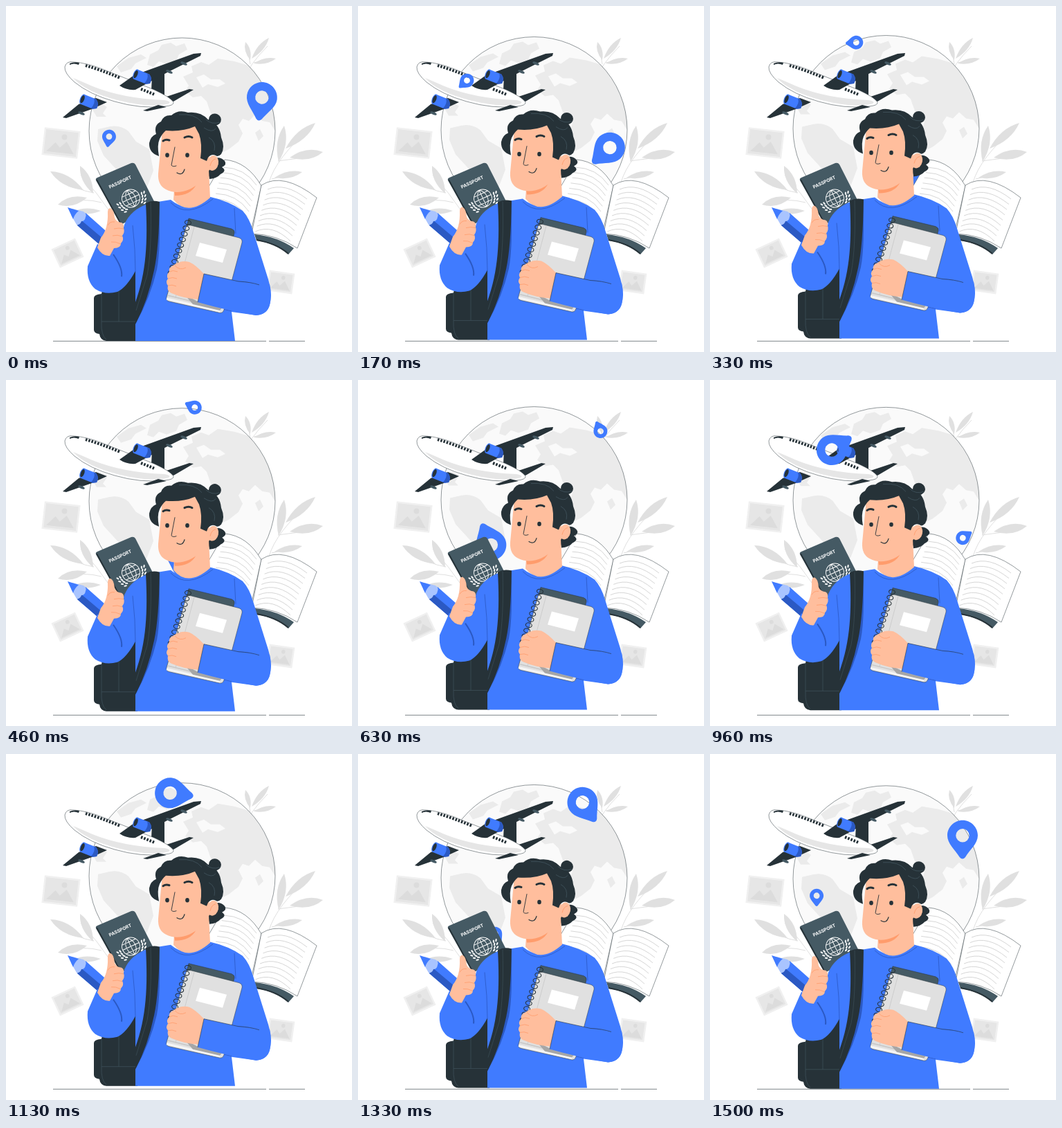
An HTML page with a canvas for the animation above (1.54 s loop, 500 by 500 pixels).

```html
<!DOCTYPE html>
<html lang="en">
<head>
<meta charset="utf-8">
<title>Travel and study</title>
<style>
html, body { margin: 0; width: 100%; height: 100%; overflow: hidden; background: #fff; }
canvas { display: block; width: 500px; height: 500px; }
</style>
</head>
<body>
<canvas id="stage" width="500" height="500"></canvas>
<script>
const ctx = document.getElementById('stage').getContext('2d');
const LOOP = 1540;
const TURN = [[0, 0], [460, 107], [1330, 318], [LOOP, 360]]; // time in ms, degrees
const BLUE = '#407bff', NAVY = '#2b59c3', DARK = '#263238', SLATE = '#455a64';
const SKIN = '#ffbe9d', SHADE = '#ff9c6c', GREY = '#e0e0e0', PALE = '#ebebeb';
const paths = new Map();

function path(d) {
  if (!paths.has(d)) paths.set(d, new Path2D(d));
  return paths.get(d);
}
function fill(d, color, rule = 'nonzero') {
  ctx.fillStyle = color;
  ctx.fill(path(d), rule);
}
function line(d, color = DARK, width = 0.7) {
  ctx.strokeStyle = color;
  ctx.lineWidth = width;
  ctx.stroke(path(d));
}
function shape(d, color, edge = DARK, width = 0.5) {
  fill(d, color);
  line(d, edge, width);
}
function oval(x, y, rx, ry, color, turn = 0) {
  ctx.fillStyle = color;
  ctx.beginPath();
  ctx.ellipse(x, y, rx, ry, turn, 0, 7);
  ctx.fill();
}
function at(x, y, degrees, scale, draw) {
  ctx.save();
  ctx.translate(x, y);
  ctx.rotate(degrees * Math.PI / 180);
  ctx.scale(scale, scale);
  draw();
  ctx.restore();
}

function leaf(x0, y0, x1, y1, width, color = GREY) {
  const length = Math.hypot(x1 - x0, y1 - y0);
  at(x0, y0, Math.atan2(y1 - y0, x1 - x0) * 180 / Math.PI, 1, () => {
    const mid = length * 0.55;
    ctx.beginPath();
    ctx.moveTo(0, 0);
    ctx.quadraticCurveTo(mid, -width, length, 0);
    ctx.quadraticCurveTo(mid, width, 0, 0);
    ctx.fillStyle = color;
    ctx.fill();
  });
}
function drawLeaves() {
  line('M344 106Q351 85 378 58M353 84L349 60M358 82L382 77', GREY, 1);
  leaf(353, 78, 346, 52, 7);
  leaf(355, 76, 380, 46, 8);
  leaf(358, 83, 390, 76, 7);
  line('M150 297Q132 270 108 244M127 270Q100 266 80 247M138 284Q112 277 88 284', GREY, 1);
  leaf(126, 271, 107, 231, 11);
  leaf(112, 266, 64, 239, 13);
  leaf(117, 277, 75, 287, 12);
  leaf(137, 296, 98, 297, 8);
  line('M380 255Q390 220 440 176M397 218L401 190M393 224Q420 222 445 214M384 250L415 242', GREY, 1);
  leaf(394, 225, 402, 173, 12);
  leaf(404, 206, 447, 169, 12);
  leaf(410, 219, 458, 211, 13);
  leaf(388, 248, 428, 240, 9);
}
function photo(x, y, degrees, width, height) {
  at(x, y, degrees, 1, () => {
    ctx.fillStyle = '#f0f0f0';
    ctx.fillRect(-width / 2, -height / 2, width, height);
    ctx.fillStyle = '#e6e6e6';
    ctx.fillRect(-width / 2 + 2.5, -height / 2 + 2.5, width - 5, height - 5);
    ctx.scale(width / 52, height / 40);
    fill('M-20 14L-8 0L-1 7L8 -3L20 14Z', '#dcdcdc');
    oval(4, -9, 4, 4, '#dcdcdc');
  });
}

function drawGlobe() {
  oval(254.5, 180.5, 134.5, 134.5, '#fafafa');
  ctx.save();
  ctx.beginPath();
  ctx.arc(254.5, 180.5, 134.5, 0, 7);
  ctx.clip();
  fill('M204 85L208 70L220 64L225 56L238 53L246 58L258 54L262 63L250 70L246 79L232 84L221 80L213 88Z', PALE);
  fill('M160 87L177 75L195 70L203 75L187 83L181 91L166 96ZM124 148L136 140L146 146L140 155L145 160L131 160Z', PALE);
  fill('M133 178L142 176Q163 169 177 181L188 196L207 207L213 238L203 264L180 264L163 240L141 216L132 195Z', PALE);
  fill('M256 102L270 96L268 87L282 81L293 85L306 76L330 80L354 87L391 145L391 184L381 168L370 166L360 157L351 166L342 163L336 172L342 184L336 196L322 207L312 212L303 190L310 171L297 158L290 138L282 130L270 132L259 123L264 115Z', PALE);
  fill('M275 103L286 99L296 106L309 106L317 112L306 117L292 113L284 118Z', '#fafafa');
  fill('M360 183L367 178L372 188L365 195Z', PALE);
  ctx.restore();
  ctx.beginPath();
  ctx.arc(254.5, 180.5, 134.5, 0, 7);
  ctx.strokeStyle = DARK;
  ctx.lineWidth = 0.5;
  ctx.stroke();
}

function engine(x, y) {
  at(x, y, 22, 1, () => {
    fill('M-11 -7L8 -7Q15 -3 14 5L9 8L-10 8Z', BLUE);
    fill('M5 -7L8 -7Q15 -3 14 5L9 8L6 8Q10 0 5 -7Z', NAVY);
    oval(-10, 0.5, 3.6, 7.6, BLUE);
    oval(-10, 0.5, 2.5, 6, DARK);
  });
}
function drawPlane() {
  fill('M211 101L229 91L229 129L210 122Z', DARK);
  fill('M229 132L265 120L271 121L242 138Z', DARK);
  shape('M98 81Q87 79 85 88Q84 97 99 110Q121 128 157 138Q195 149 229 145Q243 144 242 139Q238 132 214 121L139 91Q116 82 98 81Z', '#fff');
  fill('M97 104Q107 108 125 116Q170 134 229 136Q240 138 235 141Q211 148 165 137Q116 125 97 104Z', '#e6e6e6');
  fill('M92 83Q99 80 106 82L105 85Q98 82 92 85Z', DARK);
  ctx.setLineDash([2.6, 1.9]);
  line('M115 86Q139 93 165 104M195 120L215 128', DARK, 4.2);
  ctx.setLineDash([]);
  fill('M164 115L185 100L271 69L282 68L281 72L233 96L187 121Q174 122 164 115Z', DARK);
  fill('M82 161L105 142L130 133L146 139L124 149L87 162Z', DARK);
  fill('M198 151L220 143L232 146L204 152Z', DARK);
  for (const [x, y] of [[236, 95], [257, 83], [109, 155]]) {
    oval(x, y, 5, 2, SLATE, 0.4);
  }
  engine(197, 102);
  engine(120, 138);
}

function pin(angle, radius, start, scale) {
  const a = (angle + start) * Math.PI / 180;
  const x = 266 + radius * Math.cos(a), y = 160 + radius * Math.sin(a);
  at(x, y, angle + 8, scale, () => fill(
    'M0 -22C12 -22 22 -12 22 0C22 12 11 20 4 31.5Q0 36 -4 31.5C-11 20 -22 12 -22 0C-22 -12 -12 -22 0 -22Z' +
    'M9.7 0A9.7 9.7 0 1 0 -9.7 0A9.7 9.7 0 1 0 9.7 0Z', BLUE, 'evenodd'));
}

function drawBook() {
  fill('M359 330Q392 333 416 350L408 359Q388 342 362 339Z', SLATE);
  line('M362 338Q391 343 408 358', DARK, 2);
  shape('M369 260Q349 225 316 222L270 300L352 334Z', '#fff');
  shape('M369 259Q400 239 449 277L421 350Q391 330 355 329Z', '#fff');
  for (let i = 0; i < 9; i++) {
    const x = 378 - i * 2.2, y = 265 + i * 7.6;
    line(`M${x} ${y}Q${x + 25} ${y - 11} ${x + 57 - i * 0.8} ${y + 14}`, '#d6d6d6', 1);
    line(`M${x - 16} ${y - 6}Q${x - 33} ${y - 31} ${x - 64} ${y - 32}`, '#d6d6d6', 1);
  }
}

function drawPassport() {
  fill('M132 248L181 227Q185 226 187 229L218 290L166 316L130 252Q129 249 132 248Z', SLATE);
  line('M131 251L166 315', DARK, 1.8);
  at(166, 256.5, -25, 1, () => {
    ctx.fillStyle = '#fff';
    ctx.font = '700 6.6px Inter, sans-serif';
    ctx.textAlign = 'center';
    ctx.fillText('PASSPORT', 0, 0);
  });
  at(180.5, 278, -25, 1, () => {
    line('M13 0A13 13 0 1 0 -13 0A13 13 0 1 0 13 0M-13 0H13M0 -13V13M-11 -7H11M-11 7H11M0 -13C-9 -7 -9 7 0 13M0 -13C9 -7 9 7 0 13', '#fff', 0.9);
    for (const side of [-1, 1]) {
      for (let i = 0; i < 4; i++) {
        const a = i * 0.25;
        for (const r of [17, 21]) {
          oval(side * r * Math.cos(a), r * Math.sin(a), 2.3, 1.1, '#fff', side * (a + (r > 18 ? -1 : 1.9)));
        }
      }
    }
  });
}
function drawPencil() {
  fill('M115 299L151 331L139 348L103 317Z', BLUE);
  fill('M108 309L146 341L139 348L103 317Z', NAVY);
  fill('M96 293L112 297Q117 300 115 305Q114 311 109 311Q107 317 102 316L94 302Z', '#a9c4ff');
  fill('M89 291L105 296Q99 301 97 308Z', BLUE);
}

function drawBag() {
  fill('M139 411L190 380V484H145Q136 483 135 474Q127 473 127 468V422Q127 417 138 416Z', DARK);
  line('M138 416V456Q137 476 145 482M138 456H187M163 402V456M138 411Q152 414 168 403', SLATE, 0.6);
}
function drawSweater() {
  fill('M238 280Q264 302 292 275Q323 282 342 296Q352 307 357 325L379 395Q384 412 382 426Q381 445 362 447L326 442L331 484H187V383Q174 407 161 413Q143 418 129 409Q116 398 118 376L132 344L150 352L165 338L171 316Q180 294 207 285Z', BLUE);
  line('M238 284Q261 308 299 279M330 292L332 329M183 317Q187 352 187 384M326 441L301 435M331 398Q350 398 365 403', NAVY, 0.8);
  line('M155 359Q169 379 167 391', NAVY, 2);
  fill('M221 286Q224 349 218 381Q209 420 188 458L187 450L207 400Z', NAVY);
  fill('M202 285Q211 280 222 283Q221 350 214 382Q205 426 187 460V428C203 385 205 340 202 285Z', DARK);
  line('M209 284Q211 350 204 389L188 440', SLATE, 0.5);
}
function drawThumb() {
  fill('M147 298Q147 292 151 292Q156 294 157 306Q159 312 167 313Q171 315 170 321Q172 327 168 332Q171 338 166 343Q166 350 156 350L150 361Q139 362 132 349L137 335Q148 322 147 298Z', SKIN);
  line('M170 322Q163 320 156 322M168 333Q161 330 154 332M166 344Q158 340 152 341M157 312Q150 311 147 317', SHADE, 0.8);
}

function drawHead() {
  fill('M289 225Q308 214 316 224Q320 229 312 233Q320 238 310 243Q305 249 294 250Z', DARK);
  fill('M244 252L293 237L295 277Q263 305 242 280Z', SKIN);
  fill('M243 267Q264 266 275 258Q267 274 244 274Z', SHADE);
  fill('M226 178L276 166L292 199L295 235Q284 256 265 265Q246 273 231 265Q219 259 220 242Z', SKIN);
  oval(299, 227, 8, 11, SKIN, 0.2);
  line('M295 231Q297 222 303 221', SHADE, 0.9);
  fill('M221 217Q206 212 207 198Q209 188 217 185Q213 172 224 167Q228 157 239 158Q249 149 263 154Q281 152 292 164Q309 170 311 190Q317 204 311 214Q306 219 303 216Q297 213 292 219L290 224L281 220Q284 199 279 185L273 174Q255 182 231 180Q226 184 222 192Q218 201 221 217Z', DARK);
  oval(302, 164, 9, 8.5, DARK, 0.4);
  line('M250 157Q273 155 283 168M286 176Q298 184 303 177M289 164Q297 172 309 168M293 190Q304 196 301 209', SLATE, 0.7);
  ctx.lineCap = 'round';
  line('M227 195Q231 192 236 194M258 190Q264 187 269 190', DARK, 3);
  line('M244 204L239 230Q241 233 246 231', DARK, 0.9);
  line('M247 241Q255 246 258 236', DARK, 1.2);
  ctx.lineCap = 'butt';
  oval(233, 215.5, 2.8, 3.2, DARK);
  oval(262, 215.5, 2.8, 3.2, DARK);
}

function drawNotebook() {
  shape('M264 307L326 322Q331 324 330 328L303 438L235 418Z', SLATE);
  shape('M267 317L337 335Q342 337 341 342L315 439Q313 445 307 443L236 427Q231 426 232 421L260 320Q262 316 267 317Z', GREY);
  line('M233 418L310 437', '#c7c7c7', 1.5);
  line('M232 423L309 441', '#f5f5f5', 3);
  line('M272 319L245 421', '#c7c7c7', 0.8);
  fill('M280 342L319 352L313 371L274 361Z', '#fff');
  for (let i = 0; i < 10; i++) {
    ctx.beginPath();
    ctx.ellipse(263 - i * 2.7, 313 + i * 8.1, 4.5, 3.2, 0.25, 0, 7);
    ctx.strokeStyle = DARK;
    ctx.lineWidth = 1.1;
    ctx.stroke();
  }
}
function drawHolder() {
  fill('M258 417L277 427L314 434L309 440L270 431Z', '#a6a6a6');
  fill('M243 374Q253 367 265 370Q274 374 286 387L278 424Q258 423 239 415Q232 412 234 404Q230 399 234 394Q231 389 236 384Q234 378 243 374Z', SKIN);
  line('M236 384Q241 381 248 384M234 394Q241 391 247 394M234 404Q240 402 246 405M244 375Q251 383 260 378', SHADE, 0.8);
  fill('M286 387L336 398L381 402Q385 419 381 432Q377 446 361 447Q319 440 277 428Z', BLUE);
  line('M286 387L277 428M286 387L336 398Q354 399 366 403', DARK, 0.6);
}

function turnAt(t) {
  const i = TURN.findIndex(([time]) => time > t);
  const [t0, a0] = TURN[i - 1], [t1, a1] = TURN[i];
  return a0 + (a1 - a0) * (t - t0) / (t1 - t0);
}

function render(t) {
  const angle = turnAt(t);
  const wave = (1 - Math.cos(angle * Math.PI / 180)) / 2;
  const ramp = 1 - Math.abs(angle - 180) / 180;
  const lift = -4.25 * (wave + ramp);
  const floating = (...parts) => at(0, lift, 0, 1, () => parts.forEach(draw => draw()));

  ctx.fillStyle = '#fff';
  ctx.fillRect(0, 0, 500, 500);
  drawLeaves();
  photo(79.5, 198, 6.5, 52, 40);
  photo(89, 357, -25, 38, 30);
  photo(397, 399, 8, 37, 30);
  line('M68 484.3H376M380 484.3H432', DARK, 0.6);
  floating(drawGlobe);
  drawPlane();
  pin(angle, 107.6, -15.3, 1);
  pin(angle, 120.5, 166, 0.455);
  drawBook();
  drawPassport();
  drawPencil();
  floating(drawBag, drawSweater, drawThumb, drawHead, drawNotebook, drawHolder);
}

function frame() {
  render(performance.now() % LOOP);
  requestAnimationFrame(frame);
}
frame();
</script>
</body>
</html>
```
